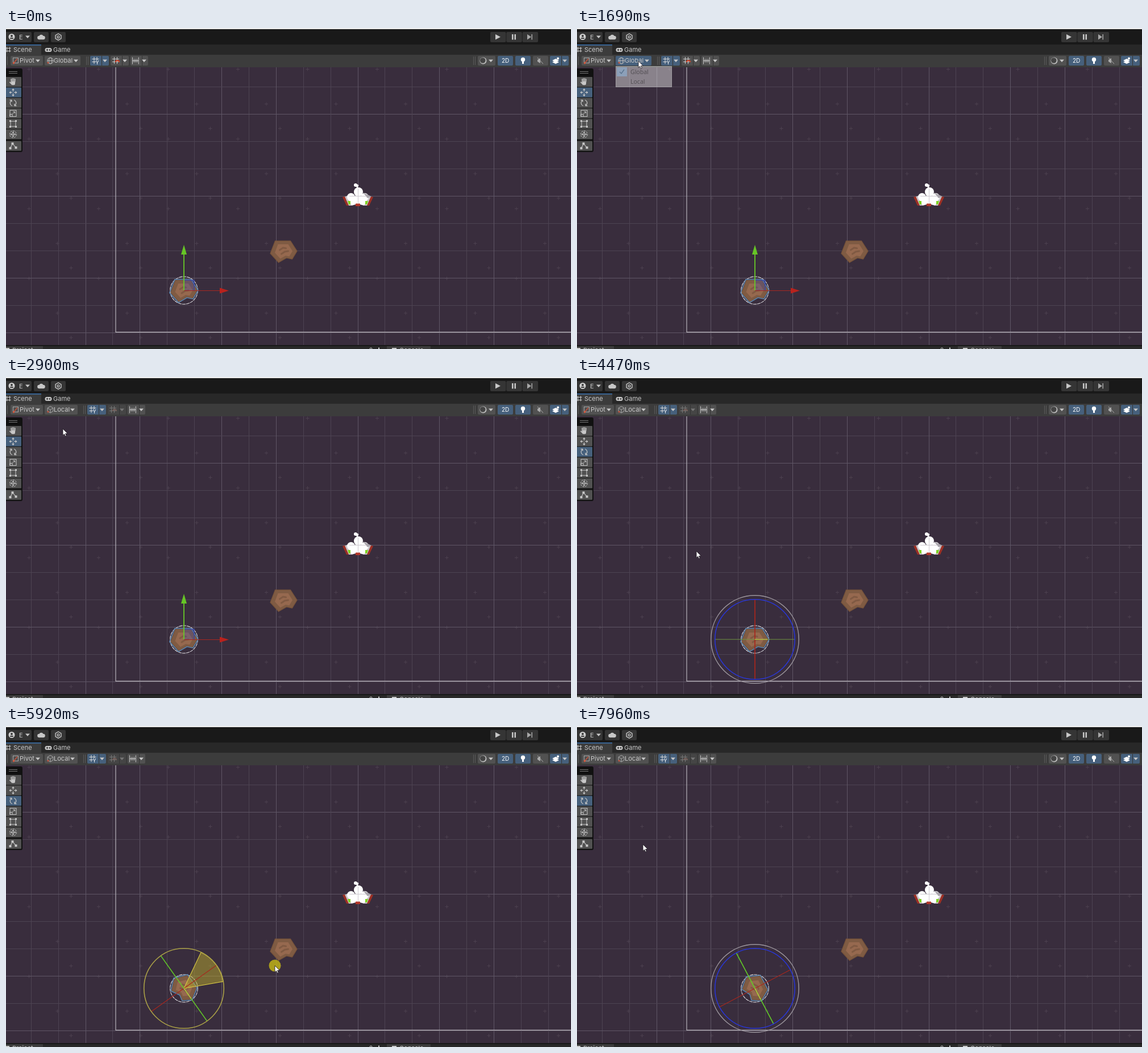
Animation of 994x564 px, one loop 8 s. Source, as an HTML page with a canvas:

```html
<!DOCTYPE html>
<html lang="en">
<head>
<meta charset="utf-8">
<title>Scene editor</title>
<style>
html, body { margin: 0; width: 100%; height: 100%; overflow: hidden; background: #191919; }
canvas { display: block; width: 100vw; height: 100vh; }
</style>
</head>
<body>
<canvas id="stage" width="994" height="564"></canvas>
<script>
const c = document.getElementById('stage').getContext('2d');
const LOOP = 8000, STEP = 68, TAU = Math.PI * 2, RAD = Math.PI / 180;
const BLUE = '#46607c', GREY = '#515151', PANEL = '#3c3c3c', INK = '#c8c8c8';
const PIVOT = { x: 313, y: 461 }, GRAB = { x: 343, y: 398 };
const GRAB_ANGLE = Math.atan2(GRAB.y - PIVOT.y, GRAB.x - PIVOT.x);

const TIME = {
  enter: 260, hover: 1290, open: 1560, fade: 1630, pick: 2540, local: 2680,
  press: 3590, rotate: 3720, tip: 3860, leave: 4190, aim: 4890, grab: 5170, drop: 7410
};

// Pointer moves: start, end, x, y
const ENTRY = { x: 828, y: 536 };
const MOVES = [
  [260, 1010, 125, 83], [1080, 1360, 108, 58], [2150, 2470, 106, 93], [2760, 2900, 100, 91],
  [2960, 3390, 8, 129], [4050, 4470, 210, 306], [4470, 4890, GRAB.x, GRAB.y],
  [5170, 5310, 353, 401], [5310, 5920, 473, 421], [5920, 6540, 492, 421], [7540, 7960, 116, 208]
];

function pointerAt(t) {
  let { x, y } = ENTRY;
  for (const [from, to, nx, ny] of MOVES) {
    if (t < from) break;
    const n = Math.max(1, Math.round((to - from) / STEP));
    const p = Math.min(1, Math.floor((t - from) / (to - from) * n + 1e-6) / n);
    x += (nx - x) * p;
    y += (ny - y) * p;
  }
  return { x, y };
}

// Dragging turns the rock by the travel along the ring's tangent, past a small dead zone.
function turnAt(t) {
  if (t < TIME.grab) return 0;
  const p = pointerAt(Math.min(t, TIME.drop));
  const travel = (GRAB.x - p.x) * Math.sin(GRAB_ANGLE) + (p.y - GRAB.y) * Math.cos(GRAB_ANGLE);
  return Math.max(0, travel - 4.4) * .445;
}

function box(x, y, w, h, fill, r = 0) {
  c.fillStyle = fill;
  c.beginPath(); c.roundRect(x, y, w, h, r); c.fill();
}
function trace(pts, close) {
  c.beginPath();
  for (let i = 0; i < pts.length; i += 2) c.lineTo(pts[i], pts[i + 1]);
  if (close) c.closePath();
}
function poly(fill, ...pts) { trace(pts, true); c.fillStyle = fill; c.fill(); }
function stroke(color, w = 1) { c.strokeStyle = color; c.lineWidth = w; c.stroke(); }
function line(color, w, ...pts) { trace(pts); stroke(color, w); }
function outline(color, w, ...pts) { trace(pts, true); stroke(color, w); }
function disc(x, y, r, fill) { c.beginPath(); c.arc(x, y, r, 0, TAU); c.fillStyle = fill; c.fill(); }
function ring(x, y, r, color, w = 1) { c.beginPath(); c.arc(x, y, r, 0, TAU); stroke(color, w); }
function frame(x, y, w, h, color) { c.strokeStyle = color; c.lineWidth = 1; c.strokeRect(x, y, w, h); }
function label(s, x, y, color = INK, size = 11, face = 'Inter') {
  c.font = `${size}px ${face}, sans-serif`;
  c.fillStyle = color;
  c.fillText(s, x, y);
}
const down = (x, color = INK, y = 57.5) => poly(color, x - 4, y - 2, x + 4, y - 2, x, y + 2.5);
function at(x, y, turn, draw) {
  c.save(); c.translate(x, y); c.rotate(turn * RAD); draw(); c.restore();
}
const around = (n, draw) => { for (let i = 0; i < n; i++) at(0, 0, i * 360 / n, draw); };
const hexagon = (x, y, r) => Array.from({ length: 12 }, (_, i) => {
  const a = (i >> 1) * TAU / 6;
  return i % 2 ? y - r * Math.cos(a) : x + r * Math.sin(a);
});
function plus(x, y, r, color) {
  line(color, 1, x - r, y, x + r, y);
  line(color, 1, x, y - r, x, y + r);
}

function backdrop() {
  box(0, 69, 994, 488, '#392d3d');
  for (let y = 72.5; y < 557; y += 122.5)
    for (let x = 40.5; x < 1100; x += 122.5) {
      plus(x, y, 3, '#4c404f');
      plus(x + 50, y + 61, 3, '#4c404f');
      plus(x + 74, y + 104, 3, '#4c404f');
    }
  for (let i = -12; i <= 7; i++) {
    const tone = [0, 3].includes(Math.abs(i) % 5) ? '#5f5666' : '#4d4352';
    const x = Math.floor(619 + i * 47.9) + .5, y = Math.floor(295.5 + i * 47.95) + .5;
    line(tone, 1, x, 69, x, 557);
    if (y > 69) line(tone, 1, 0, y, 994, y);
  }
  line('#b9b4bb', 1.2, 193, 69, 193, 534.3, 994, 534.3);
}

const ROCK = [-15, -18, 12, -18, 23.5, 0, 15, 14, 5, 12, -9, 20, -23.5, 4];
function rock() {
  poly('#7f5b43', ...ROCK);
  outline('#765239', 1.2, ...ROCK);
  poly('#96694f', ...ROCK.map(v => v * .66));
  c.lineCap = 'round';
  line('#805a43', 3, -7, -2, -1, -6, 4, -5);
  line('#805a43', 3, -4, 5, 2, 1, 8, 0);
  c.lineCap = 'butt';
}

function ship() {
  for (const side of [-1, 1]) {
    c.save();
    c.translate(619, 0);
    c.scale(side, 1);
    poly('#c9c5ca', 24, 297, 17, 294, 11, 312, 17, 312);
    poly('#9d3025', 27, 297, 23, 296, 16, 312, 20, 312);
    disc(12, 297, 7, '#fff');
    poly('#fff', 0, 293, 18, 299, 11, 312, 0, 309);
    poly('#7ed321', 18, 304, 13, 304, 13, 310, 16, 310);
    c.restore();
  }
  poly('#aaa5ac', 628, 289, 643, 296, 636, 299);
  disc(620, 288, 8, '#fff');
  disc(615, 276, 3, '#fff');
  disc(618, 277, 2.3, '#fff');
  line('#fff', 2, 616, 276, 619, 282);
  box(615, 308.5, 8, 4.5, '#b1362a');
  line('#cfcad1', 1, 604, 295.5, 634, 295.5);
  line('#cfcad1', 1, 619.5, 282, 619.5, 308);
}

function selection(turn) {
  const { x, y } = PIVOT;
  at(x, y, turn, rock);
  c.setLineDash([6, 1]);
  ring(x, y, 24.3, '#dedce0', 1.1);
  c.setLineDash([]);
  at(x, y, turn, () => outline('#5c84ad', 1.6, ...ROCK.map(v => v * 1.07)));
}

function moveGizmo() {
  at(PIVOT.x, PIVOT.y, 0, () => {
    box(0, -18, 18, 18, 'rgba(45,65,190,.25)');
    line('#3144b4', 1.2, 0, -18, 18, -18, 18, 0);
    line('#a52722', 1.1, 0, .5, 65, .5);
    poly('#b9221d', 79, .5, 63, -4.5, 63, 5.5);
    line('#67c928', 1.8, 0, 0, 0, -64);
    poly('#66c526', 0, -80, -5, -63, 5, -63);
  });
}

function turnGizmo(turn, drag, hover) {
  const { x, y } = PIVOT;
  if (drag) {
    c.beginPath();
    c.moveTo(x, y);
    c.arc(x, y, 70, GRAB_ANGLE, GRAB_ANGLE + turn * RAD);
    c.closePath();
    c.fillStyle = 'rgba(190,174,45,.48)';
    c.fill();
    stroke('#d8c943', 1.1);
  }
  const green = turn ? '#62cc27' : '#719343';
  at(x, y, turn, () => {
    line('#a9261d', turn ? 1.1 : 1.7, 0, -70, 0, 70);
    line(green, turn ? 1.6 : 1.2, -70, 0, 70, 0);
    line('#c8c345', 1.2, 0, 0, 22, 0);
  });
  ring(x, y, 70.3, drag ? '#aaa047' : hover ? '#5360e6' : '#2936d4', 1.6);
  if (!drag) ring(x, y, 77.3, '#9b959d', 1.5);
}

function topBar() {
  box(0, 0, 994, 2, '#f0f0f0');
  box(0, 2, 994, 27, '#191919');
  box(-2, 7, 47, 18, '#353535', 2);
  for (const x of [49, 79]) box(x, 7, 26, 18, '#353535', 2);
  for (let i = 0; i < 3; i++) box(852 + i * 28.3, 7, 27.5, 18, '#353535', 2);
  disc(10, 15.5, 5.5, '#d0d0d0'); disc(10, 14, 1.9, '#353535'); box(7, 17, 6, 2, '#353535', 1);
  label('E', 23, 19.5); down(38, INK, 15.5);
  for (let i = -1; i <= 1; i++) disc(62 + i * 3.5, 17 - 2 * (i === 0), 3.3, INK);
  box(58, 16, 8, 4.3, INK, 1);
  outline(INK, 1.4, ...hexagon(92, 15.7, 5.7));
  ring(92, 15.7, 1.9, INK, 1.3);
  poly(INK, 861, 11, 870, 15.7, 861, 20.5);
  box(890, 11, 2.5, 9.5, INK); box(894.5, 11, 2.5, 9.5, INK);
  poly('#a8a8a8', 917, 11, 924, 15.7, 917, 20.5); box(924.5, 11, 1.5, 9.5, '#a8a8a8');

  box(0, 29, 994, 18, '#282828');
  box(0, 29, 62, 18, PANEL);
  box(0, 29, 62, 1.5, '#3a72b0');
  hash(4, 38, 4.5, INK);
  label('Scene', 13, 42);
  box(68.5, 35, 12, 7, INK, 3.5); plus(72.5, 38.5, 2, '#282828'); disc(77, 38.5, 1.2, '#282828');
  label('Game', 83, 42);
}

function hash(x, y, r, color) {
  for (const d of [-2.5, 2.5]) {
    line(color, 1, x + d, y - r, x + d, y + r);
    line(color, 1, x - r, y + d, x + r, y + d);
  }
}
const button = (x, w, fill = GREY) => box(x, 49, w, 17, fill, 2);
function split(x, w, fill, arrow) {
  button(x, w, fill);
  line('#343434', 1, x + 20.5, 49, x + 20.5, 66);
  down(x + w - 7, arrow);
}
const bar = x => line('#5b5b5b', 1, x + .5, 50, x + .5, 65);

function space(local, fill) {
  button(68, local ? 58 : 63, fill);
  if (local) {
    outline('#aaa', 1, ...hexagon(78, 57.3, 5.7));
    line('#aaa', 1, 73, 54.5, 78, 57.5, 83, 54.5);
    line('#aaa', 1, 78, 57.5, 78, 63);
  } else {
    ring(78, 57.5, 5.3, '#bbb');
    c.beginPath(); c.ellipse(78, 57.5, 2.4, 5.3, 0, 0, TAU); stroke('#bbb');
    line('#bbb', 1, 73, 57.5, 83, 57.5);
  }
  disc(74, 61, 1.5, '#c5533d');
  label(local ? 'Local' : 'Global', 84, 61);
  down(local ? 117 : 123);
}

function gridTools(local) {
  const dim = local ? '#777' : INK;
  bar(141); bar(144);
  split(148, 33, BLUE);
  hash(157.5, 57, 6, '#dadada');
  box(158, 57, 7, 8, BLUE); label('Y', 157.5, 64, '#fff', 9);
  split(184, 32, local ? '#454545' : GREY, dim);
  hash(193, 57, 6, dim);
  c.beginPath(); c.arc(196, 60, 3, Math.PI, TAU);
  stroke(local ? '#765f5a' : '#d5492f', 2);
  split(219, 31, GREY);
  for (let i = 0; i < 5; i++) {
    const x = 222.5 + i * 2.7, r = i % 4 ? 3 : 6;
    line(INK, 1, x, 57.5 - r, x, 57.5 + r);
  }
  line(INK, 1, 223, 57.5, 233, 57.5);
}

function viewTools() {
  bar(822); bar(825);
  button(830, 31);
  disc(839.5, 57.5, 6, '#bbb'); disc(838.8, 57, 4.8, '#444'); down(853);
  button(865, 27, BLUE); label('2D', 872, 61, '#fff', 10);
  button(896, 27, BLUE); disc(909.5, 55.5, 3.7, '#fff'); box(908, 58, 3, 5, '#fff');
  button(927, 27);
  poly('#aaa', 935, 56, 940, 53, 940, 62, 935, 59);
  line('#aaa', 1, 935, 52, 945, 63);
  split(957, 33, BLUE);
  for (const y of [60, 57]) poly('#fff', 961, y, 967, y - 3, 973, y, 967, y + 3);
  disc(971, 53.5, 2, '#fff');
}

function toolbar(local, fill) {
  box(0, 47, 994, 22, PANEL);
  bar(2);
  button(8, 57);
  frame(12.5, 52.5, 9, 9, '#aaa');
  line('#c5533d', 1.5, 13, 62, 20, 54); disc(13.5, 61.5, 1.7, '#d25a40');
  label('Pivot', 24, 61); down(56);
  space(local, fill);
  at(local ? -5 : 0, 0, 0, () => gridTools(local));
  viewTools();
}

const TOOL_ICONS = [
  () => {
    box(-3.5, -1, 7, 6.5, INK, 2.5);
    for (let i = -1.5; i <= 1.5; i++) line(INK, 1.5, i * 2, 1, i * 2.3, -7 + Math.abs(i));
    line(INK, 1.7, -3, 3, -6, 0);
  },
  () => around(4, () => { line(INK, 1, 0, -1.5, 0, -5); poly(INK, 0, -7, -2.5, -4, 2.5, -4); }),
  () => around(2, () => {
    c.beginPath(); c.arc(0, 0, 5.3, -1.3, 1); stroke(INK, 1.2);
    line(INK, 1.2, 2.5, 1.5, 2.5, 5, 6, 5);
  }),
  () => { frame(-5.5, -5.5, 11, 11, INK); frame(-5.5, 1.5, 4, 4, INK); line(INK, 1, -1, 1, 3, -3); line(INK, 1, 0, -3, 3, -3, 3, 0); },
  () => { frame(-4.5, -4.5, 9, 9, INK); around(4, () => box(3.5, 3.5, 3, 3, INK)); },
  () => { c.setLineDash([3, 1.5]); ring(0, 0, 6, INK); c.setLineDash([]); plus(0, 0, 4, INK); around(4, () => poly(INK, 0, -5, -2, -2.5, 2, -2.5)); },
  () => { line(INK, 1.1, -5, 4, -1, -4, 5, 3); box(-7, 2, 4, 4, INK); box(-3, -6, 4, 4, INK); box(3, 1, 4, 4, INK); }
];
function tools(active) {
  box(-3, 71, 32, 147, '#111', 3);
  for (const y of [76.5, 79.5]) line('#777', 1, 5, y, 20, y);
  TOOL_ICONS.forEach((icon, i) => {
    const y = 86 + i * 18.4 + Math.floor(i / 6) * 2;
    box(-2, y, 29, 17.4, i === active ? BLUE : GREY, 1);
    at(12.5, y + 8.8, 0, icon);
  });
}

function bottomBar() {
  box(0, 557, 994, 7, '#191919');
  box(0, 559, 994, 5, '#282828');
  box(0, 559, 65, 5, PANEL); box(670, 559, 77, 5, PANEL);
  box(0, 562, 6, 2, INK); label('Project', 11, 570);
  box(679, 562, 8, 2, INK); label('Console', 692, 570);
  ring(642, 564, 2, INK); box(655, 561.5, 2, 3, INK);
}

function menu(alpha, hot) {
  c.globalAlpha = alpha;
  box(68, 67, 99, 37, '#f0f0f0');
  frame(68.5, 67.5, 98, 36, '#bbb');
  if (hot >= 0) box(70, 69 + hot * 17, 95, 17, '#91c9f7');
  box(70, 69, 18, 16, '#90c8f6');
  line('#16324f', 1.3, 75, 77, 78, 80, 83, 73);
  ['Global', 'Local'].forEach((s, i) => label(s, 94, 81 + i * 17, '#111', 10.5, '"Noto Sans"'));
  c.globalAlpha = 1;
}

function tooltip() {
  box(0, 149, 61, 23, '#303030');
  frame(.5, 149.5, 60, 22, '#191919');
  label('Rotate Tool', 3, 164, '#d2d2d2', 10);
}

function pointer({ x, y }, pressed) {
  if (pressed) disc(x, y, 10.5, 'rgba(190,178,24,.85)');
  at(x, y, 0, () => {
    const arrow = [0, 0, 0, 11.5, 2.6, 9.2, 4.5, 13.2, 6.3, 12.3, 4.5, 8.5, 8.2, 8.3];
    poly('#fff', ...arrow);
    outline('#1b151d', .8, ...arrow);
  });
}

function draw(t) {
  const during = (a, b) => t >= TIME[a] && t < TIME[b];
  const p = pointerAt(t), turn = turnAt(t), drag = during('grab', 'drop');
  const fill = during('open', 'local') ? BLUE : during('hover', 'open') ? '#626262' : GREY;
  backdrop();
  ship();
  at(488.5, 392, 0, rock);
  selection(turn);
  if (t >= TIME.rotate) turnGizmo(turn, drag, during('aim', 'grab')); else moveGizmo();
  topBar();
  toolbar(t >= TIME.local, fill);
  tools(t >= TIME.rotate ? 2 : 1);
  bottomBar();
  if (during('fade', 'local')) menu(Math.min(1, (t - TIME.fade + 25) / 200), Math.floor((p.y - 69) / 17));
  if (during('tip', 'leave')) tooltip();
  const pressed = during('open', 'fade') || during('pick', 'local') || during('press', 'rotate') || drag;
  if (t >= TIME.enter) pointer(p, pressed);
}

const start = performance.now();
function tick() {
  draw((performance.now() - start) % LOOP);
  requestAnimationFrame(tick);
}
tick();
</script>
</body>
</html>
```
